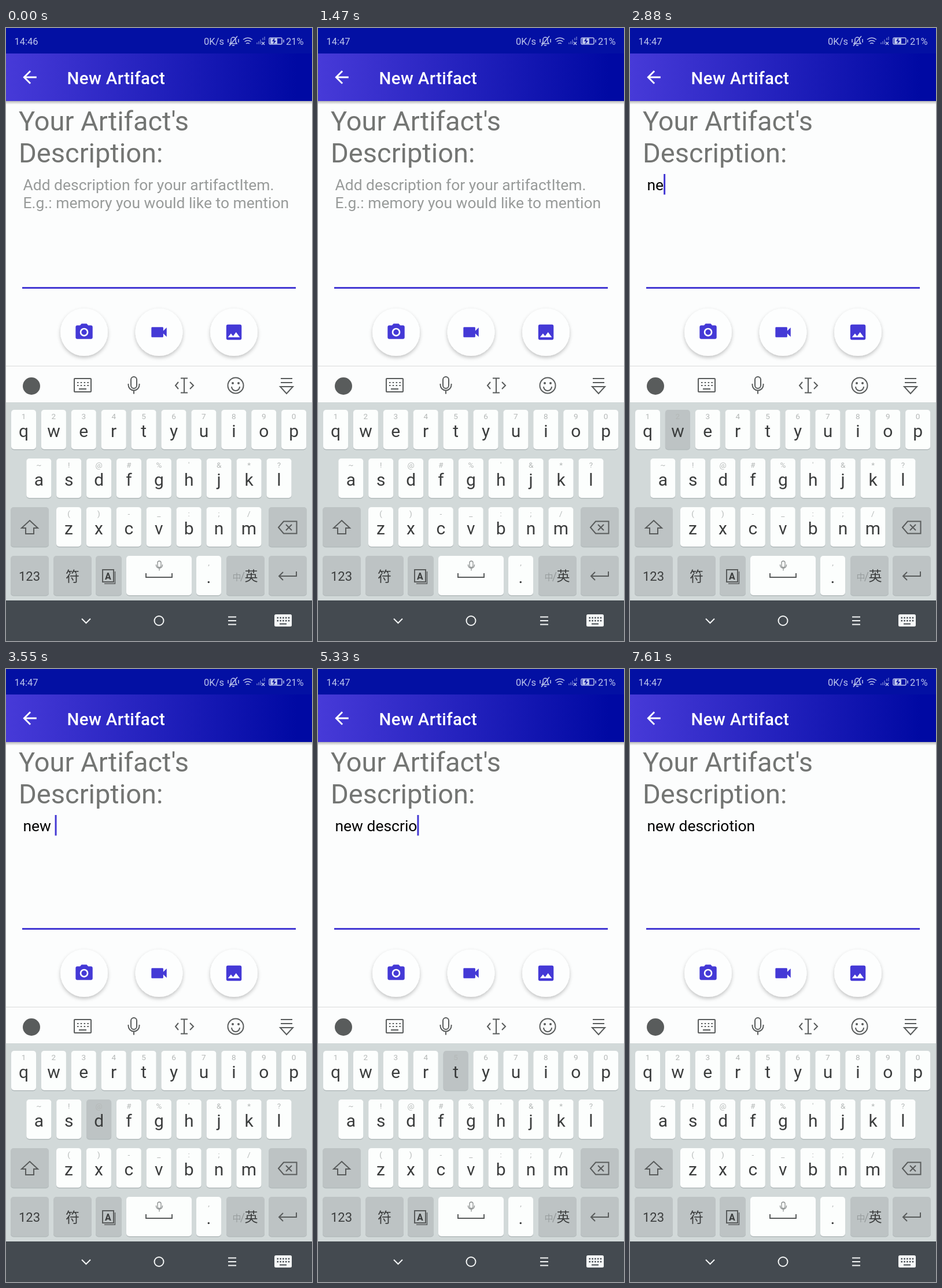
An HTML page that plays this animation: 529x1058 px, repeating every 8.1 s.

```html
<!DOCTYPE html>
<html lang="en">
<head>
<meta charset="utf-8">
<title>New Artifact</title>
<style>
  html, body { margin: 0; width: 100%; height: 100%; overflow: hidden; background: #fcfdfd; }
  svg { display: block; font-family: Roboto, "Noto Sans CJK SC", "Noto Sans CJK", sans-serif; }
  text { white-space: pre; }
  .line { fill: none; stroke: #595c5c; stroke-width: 2; }
  .mid { text-anchor: middle; }
  .letter { font-size: 30px; fill: #3b3d3d; }
  .hint { font-size: 13.5px; fill: #b4b8b7; }
  .entry { font-size: 26.45px; }
</style>
</head>
<body>
<svg width="529" height="1058" viewBox="0 0 529 1058">
  <defs>
    <linearGradient id="bar"><stop stop-color="#473ad8"/><stop offset=".95" stop-color="#0009a3"/></linearGradient>
    <linearGradient id="shade" x2="0" y2="1"><stop stop-color="#000" stop-opacity=".28"/><stop offset="1" stop-color="#000" stop-opacity="0"/></linearGradient>
    <filter id="lift" x="-30%" y="-30%" width="160%" height="160%"><feDropShadow dx="0" dy="3" stdDeviation="3" flood-opacity=".24"/></filter>
  </defs>
  <rect width="529" height="1058" fill="#fcfdfd"/>

  <!-- status bar -->
  <rect width="529" height="44" fill="#0310a3"/>
  <g fill="#bcc5ec" font-size="16.5">
    <text id="clock" x="14.5" y="28.5"></text>
    <text x="342" y="28.5">0K/s</text>
    <text x="484" y="28.5">21%</text>
  </g>
  <g fill="none" stroke="#bcc5ec" stroke-width="1.5">
    <path d="M387 27h12l-2-3v-4a4 4 0 0 0-8 0v4zM391 30h4M386 31l14-17M384 19v6M402 19v6"/>
    <path d="M410 20q8-6 16 0M412.500 23.500q5.500-4 11 0M415 27q3-2 6 0"/>
    <path d="M434 28v-3M437 28v-5M440 28v-8M444 21v-4M447 21v-6" stroke-opacity=".55"/>
    <path d="M442 24l5 5m0-5l-5 5"/>
    <rect x="455" y="17" width="22" height="11" rx="2"/>
    <path d="M480 20v5"/>
  </g>
  <rect x="457" y="18" width="12" height="9" fill="#bcc5ec"/>
  <path d="M464 17l-4 6h3l-1 5 5-6h-3z" fill="#0310a3"/>

  <!-- app bar -->
  <rect y="126" width="529" height="6" fill="url(#shade)"/>
  <rect y="44" width="529" height="82" fill="url(#bar)"/>
  <path transform="translate(23.400 67.400) scale(1.47)" fill="#fff" d="M20 11H7.830l5.590-5.590L12 4l-8 8 8 8 1.410-1.410L7.830 13H20z"/>
  <text x="105.500" y="96.500" font-size="29.4" font-weight="500" letter-spacing=".37" fill="#fff">New Artifact</text>

  <!-- form -->
  <g font-size="47" fill="#737573">
    <text x="22" y="177">Your Artifact's</text>
    <text x="22" y="232">Description:</text>
  </g>
  <g id="placeholder" class="entry" fill="#989b9a">
    <text x="29.500" y="280">Add description for your artifactItem.</text>
    <text x="29.500" y="311">E.g.: memory you would like to mention</text>
  </g>
  <text id="typed" class="entry" x="29.500" y="280"></text>
  <rect id="caret" y="252" width="3" height="35.500" fill="#4439d4"/>
  <rect x="28" y="447" width="473" height="3" fill="#4439d4"/>
  <g fill="#fdfefe" filter="url(#lift)">
    <circle cx="135" cy="525" r="41"/><circle cx="264.500" cy="525" r="41"/><circle cx="394" cy="525" r="41"/>
  </g>
  <g fill="#4439d6">
    <path transform="translate(117.400 507.400) scale(1.47)" d="M9 2L7.170 4H4a2 2 0 0 0-2 2v12a2 2 0 0 0 2 2h16a2 2 0 0 0 2-2V6a2 2 0 0 0-2-2h-3.170L15 2zm3 15a5 5 0 1 1 0-10 5 5 0 0 1 0 10zm0-1.800a3.200 3.200 0 1 0 0-6.400 3.200 3.200 0 0 0 0 6.400z"/>
    <path transform="translate(246.900 507.400) scale(1.47)" d="M17 10.500V7a1 1 0 0 0-1-1H4a1 1 0 0 0-1 1v10a1 1 0 0 0 1 1h12a1 1 0 0 0 1-1v-3.500l4 4v-11z"/>
    <path transform="translate(376.400 507.400) scale(1.47)" d="M21 19V5a2 2 0 0 0-2-2H5a2 2 0 0 0-2 2v14a2 2 0 0 0 2 2h14a2 2 0 0 0 2-2zM8.500 13.500l2.500 3L14.500 12l4.500 6H5z"/>
  </g>

  <!-- keyboard toolbar -->
  <rect y="583" width="529" height="1" fill="#d9dbdb"/>
  <circle cx="44" cy="618" r="15" fill="#595c5c"/>
  <g class="line">
    <rect x="118" y="605" width="29" height="23" rx="1"/>
    <path d="M123 612h20M123 617h20" stroke-dasharray="2.500 3.300"/><path d="M126 623h13"/>
    <rect x="216" y="602" width="10" height="20" rx="5"/><path d="M211.500 614v2a9.500 9.500 0 0 0 19 0v-2M221 625.500v6"/>
    <path d="M308 605v24M302 604.500h12M302 629.500h12M298 611l-5 6 5 6M318 611l6 6-6 6"/>
    <circle cx="397" cy="617" r="13.500"/><path d="M390 619a7 7 0 0 0 14 0"/>
    <path d="M475 605h20M475 612h20M474 619h22l-11 12z"/>
  </g>
  <circle cx="392" cy="613" r="2" fill="#595c5c"/><circle cx="402" cy="613" r="2" fill="#595c5c"/>

  <!-- keyboard -->
  <rect y="646" width="529" height="342" fill="#d2d9d9"/>
  <g id="keys"></g>
  <g class="line">
    <path d="M41 850l14 13h-7v10H34V863h-7z"/>
    <path d="M471 862l9-10.500h22.500v21H480zM484 857l10 10m0-10l-10 10"/>
    <path d="M502 938v8h-30M479 939l-7 7 7 7"/>
    <rect x="167" y="935" width="19" height="21"/><path d="M170 959h18.500V938" stroke-width="1.500"/>
    <path d="M242 941v7h45v-7"/>
    <g stroke="#8b8f8f" stroke-width="1.300"><rect x="262" y="920" width="6" height="11" rx="3"/><path d="M259.500 926v1a5.500 5.500 0 0 0 11 0v-1M265 932.500v4"/></g>
  </g>
  <g class="mid" fill="#3b3d3d">
    <text x="40.500" y="954" font-size="22">123</text>
    <text x="115" y="955" font-size="24">符</text>
    <text x="176.500" y="952" font-size="16" font-weight="700">A</text>
    <text x="399" y="953" font-size="15" fill="#989d9e">中</text>
    <text x="409" y="954" font-size="20" fill="#989d9e">/</text>
    <text x="424" y="954" font-size="23">英</text>
  </g>

  <!-- navigation bar -->
  <rect y="988" width="529" height="70" fill="#444a50"/>
  <g fill="none" stroke="#f3f5f5" stroke-width="2">
    <path d="M131 1019.500l7.500 7.500 7.500-7.500M384 1016.500h14M384 1023h14M384 1029.500h14"/>
    <circle cx="264.500" cy="1023" r="8"/>
  </g>
  <rect x="464" y="1012" width="30" height="21" rx="2.500" fill="#f6f8f8"/>
  <path d="M468.500 1018h22M468.500 1023h22" stroke="#444a50" stroke-width="2.500" stroke-dasharray="2.500 2.300"/>
  <path d="M473 1028.500h12" stroke="#444a50" stroke-width="2"/>
</svg>
<script>
const LOOP = 8100, TEXT_X = 29.5;
const WHITE = '#fcfefd', GREY = '#bdc3c4';
const $ = id => document.getElementById(id);
const keys = {};

function add(tag, attrs, content = '') {
  const node = document.createElementNS('http://www.w3.org/2000/svg', tag);
  for (const name in attrs) node.setAttribute(name, attrs[name]);
  node.textContent = content;
  return $('keys').appendChild(node);
}

function addKey(x, y, width, fill) {
  add('rect', { x, y: y + 1.5, width, height: 68, rx: 5, fill: '#b3bbbc' });
  return add('rect', { x, y, width, height: 68, rx: 5, fill });
}

function addRow(x, y, letters, hints) {
  [...letters].forEach((letter, i) => {
    const left = x + i * 51.9, center = left + 21.5;
    keys[letter] = addKey(left, y, 43, WHITE);
    add('text', { x: center, y: y + 16, class: 'mid hint' }, hints[i]);
    add('text', { x: center, y: y + 47, class: 'mid letter' }, letter);
  });
}

addRow(9, 659, 'qwertyuiop', '1234567890');
addRow(35.3, 743, 'asdfghjkl', "~!@#%'&*?");
addRow(87, 827, 'zxcvbnm', '()-_:;/');
addRow(329, 911, '.', ',');
keys[' '] = addKey(208, 911, 113, WHITE);
for (const [x, y, width] of [[8, 827, 66], [454, 827, 66], [8, 911, 66], [82, 911, 66],
  [155, 911, 45], [381, 911, 66], [454, 911, 66]]) addKey(x, y, width, GREY);

// Each key press: character, time down, time up (the character appears on release).
const presses = [
  ['n', 2150, 2230], ['e', 2650, 2730], ['w', 2880, 2980], [' ', 3130, 3220],
  ['d', 3550, 3640], ['e', 3750, 3850], ['s', 3960, 4050], ['c', 4250, 4350],
  ['r', 4630, 4720], ['i', 4860, 4950], ['o', 5100, 5190], ['t', 5330, 5420],
  ['i', 5520, 5620], ['o', 5780, 5870], ['n', 6030, 6110]
];

function draw(t) {
  const done = presses.filter(([, , up]) => t >= up);
  const held = presses.find(([, down, up]) => t >= down && t < up);
  const blinkStart = done.length ? done[done.length - 1][2] : -30;

  $('clock').textContent = t < 1470 ? '14:46' : '14:47';
  $('typed').textContent = done.map(([char]) => char).join('');
  $('placeholder').style.display = done.length ? 'none' : '';
  $('caret').setAttribute('x', TEXT_X + (done.length ? $('typed').getComputedTextLength() : 0));
  $('caret').style.display = t >= 20 && (t - blinkStart) % 1000 < 500 ? '' : 'none';
  for (const char in keys) keys[char].setAttribute('fill', held && held[0] === char ? GREY : WHITE);
}

const start = performance.now();
function tick() {
  draw((performance.now() - start) % LOOP);
  requestAnimationFrame(tick);
}
tick();
</script>
</body>
</html>
```
